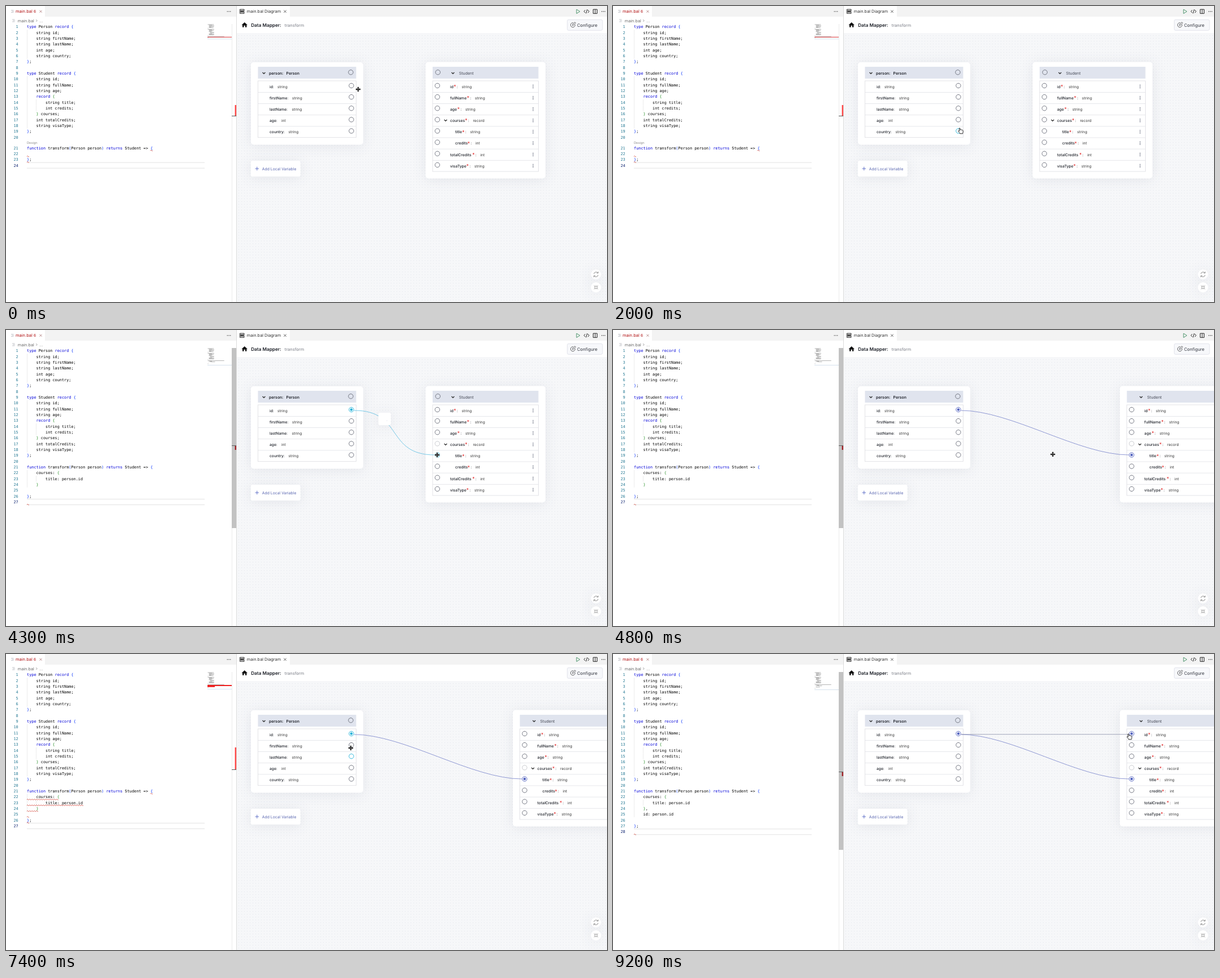
Animation, 1065 px wide and 526 px high, one loop 9300 ms. Source, as an HTML page:

```html
<!DOCTYPE html>
<html lang="en">
<head>
<meta charset="utf-8">
<title>Data Mapper</title>
<style>
html, body { margin: 0; width: 100%; height: 100%; overflow: hidden; background: #fff; }
svg { display: block; width: 1065px; height: 526px; font-family: Inter, "Open Sans", sans-serif; text-rendering: geometricPrecision; }
.code text { font: 6.86px "DejaVu Sans Mono", "Liberation Mono", monospace; white-space: pre; }
.card { fill: #fff; filter: drop-shadow(0 2px 11px rgba(40, 50, 90, .09)); }
.line { fill: none; stroke: #222; stroke-width: 1; }
.port { fill: #fff; stroke: #686b78; stroke-width: .9; }
.link { fill: none; stroke: #6b77c6; stroke-width: .75; }
.wave { fill: none; stroke: #d0382c; stroke-width: .7; }
</style>
</head>
<body>
<svg id="stage" viewBox="0 0 1065 526" xmlns="http://www.w3.org/2000/svg"></svg>
<script>
const LOOP = 9300, STEP = 100, SHIFT = 154.6, REACH = 88;
const CYAN = '#20b2d8', NAVY = '#5464c0';
const LINE_H = 10.33, CHAR = 4.13, LEFT = 37;
const T = { linked: 4100, coded: 4300, moved: 4600, checked: 4900, picked: 6800, linked2: 9000, coded2: 9200 };

const rect = (x, y, w, h, fill, more = '') =>
  `<rect x="${x}" y="${y}" width="${w}" height="${h}" fill="${fill}" ${more}/>`;
const path = (d, more = 'class="line"') => `<path d="${d}" ${more}/>`;
const circle = (x, y, r, more) => `<circle cx="${x}" cy="${y}" r="${r}" ${more}/>`;
const text = (x, mid, size, fill, str, more = '') =>
  `<text x="${x}" y="${mid + size * .36}" font-size="${size}" fill="${fill}" ${more}>${str}</text>`;
const group = (id, body, more = '') => `<g id="${id}" ${more}>${body}</g>`;
const dots = (x, y, dx, dy, fill) =>
  [-1, 0, 1].map(i => circle(x + i * dx, y + i * dy, .75, `fill="${fill}"`)).join('');
const cross = (x, y, s, color) =>
  path(`M${x - s} ${y - s}l${2 * s} ${2 * s}m0 ${-2 * s}l${-2 * s} ${2 * s}`, `fill="none" stroke="${color}" stroke-width=".8"`);
const chevron = (x, y) => path(`M${x - 2.4} ${y - 1.2}l2.4 2.5 2.4 -2.5`, 'fill="none" stroke="#222" stroke-width="1.2"');
const fileIcon = (x, y) => path(`M${x} ${y - 2}h4.5M${x + 1} ${y}h4M${x} ${y + 2}h4.5`, 'stroke="#b5b8be" stroke-width=".8"');

// ---- code editor ----
const head = `type Person record {
    string id;
    string firstName;
    string lastName;
    int age;
    string country;
};

type Student record {
    string id;
    string fullName;
    string age;
    record {
        string title;
        int credits;
    } courses;
    int totalCredits;
    string visaType;
};

function transform(Person person) returns Student => {
`;
const mapped = '    courses: {\n        title: person.id\n    }';
const sources = {
  empty: head + '\n};\n',
  first: head + mapped + '\n\n};\n',
  both: head + mapped + ',\n    id: person.id\n\n};\n'
};

const lineY = (n, lens) => LEFT + LINE_H * (n - 1) + (lens && n > 20 ? 8.6 : 0);

function tokens() {
  let depth = 0;
  const span = (s, c) => `<tspan fill="${c}">${s}</tspan>`;
  const level = () => depth ? '#319331' : '#0431fa';
  return line => line.replace(/\b(type|record|function|returns)\b|=>|[{}()]/g, s => {
    if (s === '=>') return '=&gt;';
    if (s === '{') { const out = span(s, level()); depth++; return out; }
    if (s === '}') { depth--; return span(s, level()); }
    return span(s, /[()]/.test(s) ? '#0431fa' : '#0000d8');
  });
}

function wave(n, from, chars, lens) {
  const x = LEFT + from * CHAR, y = lineY(n, lens) + 5;
  const teeth = Math.max(1, Math.round(chars * CHAR / 4));
  return path(`M${x} ${y}` + 'l1 -1.3 2 1.8 1 -.5'.repeat(teeth), 'class="wave"');
}

function editor(id, lens) {
  const lines = sources[id].split('\n'), paint = tokens(), last = lines.length;
  const y = lineY(last, lens);
  let out = path(`M37 ${y - 5}H352M37 ${y + 5}H352`, 'stroke="#dcdcdc" stroke-width=".8"');
  lines.forEach((line, i) => {
    const n = i + 1, mid = lineY(n, lens);
    out += text(21.7, mid, 6.86, n === last ? '#0b216f' : '#237893', n, 'text-anchor="end"');
    if (!line) return;
    out += text(LEFT, mid, 6.86, '#000', paint(line));
    const pad = line.search(/\S/);
    if (pad) out += rect(LEFT, mid - 5.2, .5, LINE_H, '#d6d6d6');
    if (pad > 4) out += rect(LEFT + 4 * CHAR, mid - 5.2, .5, LINE_H, '#d6d6d6');
    out += rect(357.5 + pad * .54, 32.6 + i * 1.08, (line.length - pad) * .54, .7, '#555', 'opacity=".62"');
  });
  if (lens) out += text(37, 242.5, 5.7, '#8c8c8c', 'Design', 'style="font:5.7px Inter,sans-serif"');
  return group(id, out);
}

const errorsA = wave(21, 53, 1, true) + wave(22, 0, 1, true) + wave(23, 0, 1, true)
  + rect(357, 54.8, 43, 1, '#d8343a') + rect(357, 58.3, 43, .6, '#b9d3f2')
  + rect(405.6, 176, 2.6, 20, '#ff4848') + rect(400, 195, 8, 1, '#555');
const errorsB = wave(21, 53, 1) + wave(22, 0, 14) + wave(23, 0, 24) + wave(24, 0, 5) + wave(25, 0, 1) + wave(26, 0, 1)
  + rect(357, 55, 43, 2, '#f02020') + rect(357, 57, 13, 1.8, '#f02020') + rect(357, 62, 43, .6, '#b9d3f2')
  + rect(405.6, 166, 2.6, 39, '#ff4848') + rect(400, 205, 8, 1, '#555');
const slider = (n, bottom, y, edge) => rect(400, 32, 8, bottom - 32, '#c2c2c2') + rect(400, y, 8, .9, '#555')
  + rect(405.6, y + 1, 2.4, 7, '#a02228') + wave(n, 0, 1) + rect(357, edge, 43, .6, '#b9cde2');

const leftPane = rect(0, 0, 408, 526, '#fff') + rect(69, 0, 339, 19, '#f3f3f3')
  + fileIcon(9, 9.5) + text(17, 9.7, 7.5, '#b01011', 'main.bal') + text(49, 9.7, 6.8, '#b01011', '6')
  + cross(61.5, 9.7, 2, '#a56a6a') + dots(395, 9.8, 2.7, 0, '#444')
  + fileIcon(11, 26) + text(20.8, 26, 7.3, '#6a6a6a', 'main.bal')
  + path('M53.3 24l2 2 -2 2', 'fill="none" stroke="#777" stroke-width=".7"') + text(59, 26, 7.3, '#6a6a6a', '...')
  + rect(400, 32, .6, 494, '#dedede');

// ---- diagram ----
const rowY = i => 141.5 + i * 20.13;
const port = (id, x, y) => group(id, circle(x, y, 4.2, 'class="port"') + circle(x, y, 2.3, 'class="dot" fill="none"'));
const rows = (x, w, n) => rect(x, 133, w, n * 20.13, '#fff', 'stroke="#dcdde2" stroke-width=".8"')
  + Array.from({ length: n - 1 }, (_, i) => rect(x, 133 + (i + 1) * 20.13, w, .7, '#dcdde2')).join('');
const bold = 'font-weight="500"';

const personFields = [['id', 'string', 481], ['firstName', 'string', 507], ['lastName', 'string', 506.5],
  ['age', 'int', 488], ['country', 'string', 500.5]];
const studentFields = [['id', 'string', 807.5], ['fullName', 'string', 831], ['age', 'string', 814],
  ['courses', 'record', 827.5], ['title', 'string', 822.5, 796], ['credits', 'int', 832, 796],
  ['totalCredits', 'int', 840.5], ['visaType', 'string', 830]];

const person = '<rect class="card" x="434" y="100" width="199" height="146.5" rx="5"/>'
  + rect(446.5, 108, 174, 21, '#e0e4ee') + chevron(457, 119.2)
  + text(466, 119.5, 6.9, '#1d2028', 'person:', 'font-weight="600"')
  + text(496.5, 119.5, 6.9, '#1d2028', 'Person', 'font-weight="600"')
  + circle(611, 117.8, 4.2, 'class="port" style="fill:none"') + rows(446.5, 174, 5)
  + personFields.map(([name, type, x], i) => text(467, rowY(i) + 1.8, 6.7, '#1d2028', name + ':', bold)
    + text(x, rowY(i) + 1.8, 6.6, '#333', type) + port('src' + i, 612, rowY(i))).join('');

const student = '<rect class="card" x="743.5" y="99.5" width="212.5" height="207" rx="5"/>'
  + rect(756, 108, 187.5, 21, '#e0e4ee')
  + group('title', chevron(792, 119.2) + text(802.8, 119.7, 7, '#444855', 'Student'))
  + group('rootPort', circle(765.3, 117.8, 4.2, 'class="port" style="fill:none"')) + rows(756, 187.5, 8) + chevron(779, 203.2)
  + studentFields.map(([name, type, tx, x = 787], i) => {
    const y = rowY(i) + 1.9;
    return text(x, y, 6.8, '#1d2028', name, bold) + text(tx - 14.2, y - .4, 8.5, '#e02020', '*')
      + text(tx - 8.8, y, 6.8, '#1d2028', ':', bold) + text(tx, y, 6.6, '#333', type)
      + dots(934, y - .4, 0, 2.4, '#4a5268') + port('dst' + i, 764.4, rowY(i));
  }).join('');

const refreshIcon = path('M1041.7 476a4 4 0 0 1 7.2 -1.6M1049.3 478a4 4 0 0 1 -7.2 1.6M1049.3 472v2.6h-2.6M1041.7 482v-2.6h2.6',
  'fill="none" stroke="#666" stroke-width=".7"');
const fitIcon = path('M1042 496.5l2.5 2.5m0 -2.2v2.2h-2.2M1049 496.5l-2.5 2.5m0 -2.2v2.2h2.2M1042 503.5l2.5 -2.5m0 2.2v-2.2h-2.2M1049 503.5l-2.5 -2.5m0 2.2v-2.2h2.2',
  'fill="none" stroke="#777" stroke-width=".6"');

const rightPane = rect(408, 0, 657, 19, '#f3f3f3') + rect(409, 0, 94, 19, '#fff') + rect(409, 19, 656, 29, '#fff')
  + rect(409, 48, 656, 478, '#f6f7f9') + rect(409, 48, 656, 478, 'url(#grid)') + rect(408, 0, .8, 526, '#d4d4d4')
  + path('M414.5 6h7.5v2.2h-7.5zM414.5 11h7.5v2.2h-7.5zM418 8.2v2.8M413.5 9.6h9') + text(426.8, 9.7, 7.35, '#333', 'main.bal Diagram')
  + cross(494.5, 9.7, 2.2, '#333') + path('M1011 6l6 3.7 -6 3.7z', 'fill="none" stroke="#388a5c" stroke-width=".9"')
  + path('M1026.5 7l-2.3 2.6 2.3 2.6M1031 7l2.3 2.6 -2.3 2.6M1030 6l-2.2 7.3') + path('M1040.5 6h7v7.3h-7zM1044 6v7.3')
  + dots(1058.5, 9.8, 2.7, 0, '#333')
  + path('M417.5 33.8l5.2 -4.8 5.2 4.8h-1.5v4h-2.5v-3h-2.4v3h-2.5v-4z', 'fill="#111"')
  + text(434.2, 33.8, 8.2, '#1d2028', 'Data Mapper:', 'font-weight="600"') + text(493.8, 33.8, 7.5, '#7a7d86', 'transform')
  + rect(994.5, 24.3, 62.5, 19, '#f7f8fb', 'rx="2.5" stroke="#dfe1e9" stroke-width=".9"')
  + path('M1005.2 29.8a4 4 0 1 0 3.2 3.2M1003.7 34.5l.4 -2 4 -3.8 1.5 1.5 -4 3.8z', 'class="line" style="stroke-width:.7"')
  + text(1012, 34, 7.7, '#33363f', 'Configure')
  + '<rect class="card" x="433.8" y="275" width="88" height="28" rx="3"/>'
  + path('M441.5 289h6.6M444.8 285.7v6.6', 'stroke="#5567c5" stroke-width=".9"')
  + text(453.8, 289.3, 6.85, '#5966b0', 'Add Local Variable')
  + circle(1045.5, 477, 9, 'class="card"') + circle(1045.5, 500, 9, 'class="card"') + refreshIcon + fitIcon;

const links = path('', 'id="link" class="link"') + path('M617 142.8H914', 'id="link2" class="link" style="stroke:#858aa5"')
  + group('busy', '<rect class="card" x="660" y="147" width="22" height="22" rx="3"/>' + circle(675, 161, .5, 'fill="#ccd"'));
const linkTo = x => `M617 143C${617 + REACH} 143 ${x - REACH} 222 ${x} 222`;

const cursors = group('move', path('M0 -4.6l1.9 2.2h-1.2v1.7h1.7v-1.2l2.2 1.9 -2.2 1.9v-1.2h-1.7v1.7h1.2l-1.9 2.2 -1.9 -2.2h1.2v-1.7h-1.7v1.2l-2.2 -1.9 2.2 -1.9v1.2h1.7v-1.7h-1.2z',
    'fill="#000" stroke="#fff" stroke-width="1.2" paint-order="stroke"'))
  + group('hand', path('M-2.6 -4.2c0 -1.2 1.7 -1.2 1.8 0l.3 2.4c.4 -.7 1.4 -.6 1.6 .1c.5 -.6 1.4 -.4 1.6 .3c.8 -.4 1.6 0 1.6 .9v2.5c0 1 -.6 1.5 -.6 2.8h-5c-.2 -1.6 -1.9 -2.5 -2.8 -4.2c-.4 -.9 .8 -1.4 1.5 -.6l.6 .6z',
    'fill="#fff" stroke="#111" stroke-width=".9"'))
  + group('deny', circle(5.5, 12.5, 3.8, 'fill="#eee" stroke="#aaa" stroke-width="1.3"')
    + path('M3 10l5 5', 'stroke="#aaa" stroke-width="1.2"')
    + path('M0 0v8.2l1.9 -1.7 1.3 3 1.4 -.6 -1.3 -2.9h2.6z', 'fill="#000" stroke="#fff" stroke-width=".7"'));

document.getElementById('stage').innerHTML =
  '<defs><pattern id="grid" width="5" height="5" patternUnits="userSpaceOnUse"><circle cx="2.5" cy="2.5" r=".5" fill="#dcdfe6"/></pattern></defs>'
  + leftPane + `<g class="code">${editor('empty', true)}${editor('first')}${editor('both')}</g>`
  + group('errorsA', errorsA) + group('errorsB', errorsB)
  + group('sliderB', slider(27, 352, 205, 62)) + group('sliderC', slider(28, 348, 209, 63))
  + rightPane + person + group('student', student) + links + group('cursor', cursors);

// ---- timeline ----
const $ = id => document.getElementById(id);
const show = (id, on) => $(id).setAttribute('display', on ? 'inline' : 'none');
const slide = (id, x, y = 0) => $(id).setAttribute('transform', `translate(${x} ${y})`);

// time, x, y, pointer shape from then on
const track = [
  [0, 624, 148, 'move'], [900, 626, 160, 'move'], [1200, 626, 184, 'move'], [1400, 616, 222, 'hand'], [2000, 616, 222, 'hand'],
  [2300, 625, 204, 'move'], [2600, 616, 172, 'hand'], [2700, 615, 166, 'hand'], [2800, 615, 166, 'hand'],
  [3200, 615, 147, 'hand'], [3600, 615, 147, 'move'], [4100, 764, 222, 'move'], [4700, 764, 222, 'move'],
  [5200, 912, 212, 'deny'], [5900, 916, 202, 'deny'], [6100, 905, 196, 'move'], [6800, 614, 146, 'hand'],
  [6900, 614, 146, 'move'], [7200, 613, 187, 'move'], [7400, 611, 167, 'move'], [7700, 614, 147, 'move'],
  [7900, 618, 147, 'move'], [8800, 915, 147, 'hand'], [LOOP, 915, 147, 'hand']
];
// source row, from, to
const hovers = [[2, 1300, 1600], [4, 1600, 2200], [2, 2400, 2600], [1, 2600, 2900], [0, 2900, 3200], [2, 7100, 7500]];

function setPort(id, color, filled) {
  const [ring, dot] = $(id).children;
  ring.style.stroke = color || '';
  dot.setAttribute('fill', filled ? color : 'none');
}

function pointer(t) {
  const i = track.findIndex((k, n) => t >= k[0] && t < track[n + 1][0]);
  const [t0, x0, y0, shape] = track[i], [t1, x1, y1] = track[i + 1];
  const u = (t - t0) / (t1 - t0), e = u * u * (3 - 2 * u);
  slide('cursor', x0 + (x1 - x0) * e, y0 + (y1 - y0) * e);
  ['move', 'hand', 'deny'].forEach(s => show(s, s === shape));
}

function render(t) {
  const coded = t >= T.coded, coded2 = t >= T.coded2, moved = t >= T.moved, linked = t >= T.linked;
  const checked = t >= T.checked && !coded2;
  show('empty', !coded);
  show('errorsA', !coded);
  show('first', coded && !coded2);
  show('both', coded2);
  show('errorsB', checked);
  show('sliderB', coded && t < T.checked);
  show('sliderC', coded2);

  slide('student', moved ? SHIFT : 0);
  slide('title', moved ? -10.8 : 0);
  show('rootPort', !moved);
  $('dst3').setAttribute('opacity', linked ? .4 : 1);

  show('link', linked);
  $('link').setAttribute('d', linkTo(moved ? 914 : 760));
  $('link').style.stroke = moved ? '' : '#4cb9df';
  show('busy', linked && !moved);
  show('link2', t >= T.linked2);

  personFields.forEach((_, i) => setPort('src' + i, hovers.some(([r, a, b]) => r === i && t >= a && t < b) && CYAN));
  if (t >= 3200) {
    const active = !moved || (t >= T.picked && t < T.linked2);
    setPort('src0', active ? CYAN : NAVY, true);
  }
  setPort('dst4', linked && (moved ? NAVY : CYAN), linked);
  setPort('dst0', t >= T.linked2 && NAVY, t >= T.linked2);
  pointer(t);
}

const start = performance.now();
function tick() {
  const t = (performance.now() - start) % LOOP;
  render(Math.floor(t / STEP) * STEP);
  requestAnimationFrame(tick);
}
tick();
</script>
</body>
</html>
```
